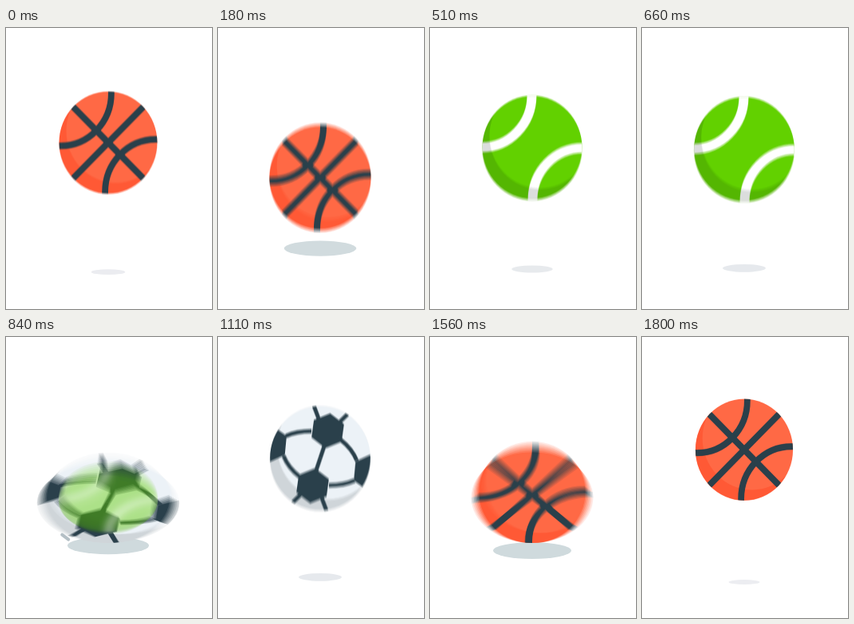
An HTML page with a canvas for the animation above (1.83 s loop, 258 px wide and 352 px high).

```html
<!DOCTYPE html>
<html lang="en">
<head>
<meta charset="utf-8">
<title>Bouncing balls</title>
<style>
  html, body { margin: 0; width: 100%; height: 100%; overflow: hidden; background: #fff; }
  canvas { display: block; }
</style>
</head>
<body>
<canvas id="stage" width="258" height="352"></canvas>
<script>
const W = 258, H = 352, LOOP = 1830, STEP = 30;
const HOP = LOOP / 3, LEAD = 30;
const R = 63, CX = 128, TOP = 141, FLOOR = 257;
const INK = '#2a404b';
const SHUTTER = 22, SAMPLES = 8;

const stage = document.getElementById('stage').getContext('2d');
const buffer = Object.assign(document.createElement('canvas'), { width: W, height: H });
const ctx = buffer.getContext('2d');

const clamp = v => Math.max(0, Math.min(1, v));
const lerp = (a, b, k) => a + (b - a) * k;

function disc(x, y, r, fill) {
  ctx.beginPath();
  ctx.arc(x, y, r, 0, 7);
  ctx.fillStyle = fill;
  ctx.fill();
}

function line(width, color, x1, y1, x2, y2, bendX = x1, bendY = y1) {
  ctx.beginPath();
  ctx.moveTo(x1, y1);
  ctx.quadraticCurveTo(bendX, bendY, x2, y2);
  ctx.lineWidth = width;
  ctx.strokeStyle = color;
  ctx.stroke();
}

function hexagon(x, y, r, turn) {
  ctx.beginPath();
  for (let i = 0; i < 6; i++) {
    const a = turn + i * Math.PI / 3;
    ctx.lineTo(x + r * Math.cos(a), y + r * Math.sin(a));
  }
  ctx.fillStyle = INK;
  ctx.fill();
}

// two seams bending away from the middle
function seams(offset, r, width, color) {
  ctx.lineWidth = width;
  ctx.strokeStyle = color;
  for (const side of [-1, 1]) {
    ctx.beginPath();
    ctx.arc(side * offset, side * offset, r, 0, 7);
    ctx.stroke();
  }
}

// crescent along the lower left edge
function shade(color) {
  ctx.beginPath();
  ctx.rect(-90, -90, 180, 180);
  ctx.arc(10, -14, R + 1, 0, 7);
  ctx.fillStyle = color;
  ctx.fill('evenodd');
}

function basketball() {
  disc(0, 0, R + 2, '#ff6945');
  shade('rgba(255,70,35,.45)');
  seams(61, 65, 8, INK);
  for (const side of [-1, 1]) line(8, INK, -50, side * 49, 50, side * -49);
}

function tennis() {
  disc(0, 0, R + 2, '#62d100');
  seams(63.5, 63, 12, '#fff');
  shade('rgba(0,20,20,.14)');
}

// the pattern is one half, repeated after a half turn
function soccer() {
  disc(0, 0, R + 2, '#ecf2f7');
  shade('rgba(0,0,0,.12)');
  ctx.scale(1, .96);
  for (let half = 0; half < 2; half++) {
    hexagon(9.5, -34.5, 22, .66);
    hexagon(-64, -18, 24, -.43);
    line(5, INK, 0, 0, 6, -18);
    line(5, INK, -2, -50, -8, -66);
    line(5, INK, 24, -45, 37, -58);
    line(5, INK, -11, -34, -43, -28, -30, -34);
    line(5, INK, 26, -23, 46, 3, 40, -12);
    ctx.rotate(Math.PI);
  }
}

const BALLS = [basketball, tennis, soccer];

function ball(draw, x, y, sx, sy) {
  ctx.save();
  ctx.translate(x, y);
  ctx.scale(sx, sy);
  ctx.beginPath();
  ctx.arc(0, 0, R, 0, 7);
  ctx.clip();
  draw();
  ctx.restore();
}

function shadow(drop) {
  const w = 39 + 1.45 * drop - .0073 * drop * drop;
  const h = 6 + (w - 39) * .254;
  const k = clamp(drop / 50);
  const rgb = [lerp(236, 207, k), lerp(237, 218, k), lerp(241, 221, k)].map(Math.round);
  ctx.beginPath();
  ctx.ellipse(CX, 307 - .53 * drop - .0029 * drop * drop, w / 2, h / 2, 0, 0, 7);
  ctx.fillStyle = `rgb(${rgb})`;
  ctx.fill();
}

// short dash thrown up and left by the impact
function dash(sinceHit) {
  const k = (sinceHit + 60) / 110;
  if (k < 0 || k > 1) return;
  const x = lerp(79, 44, k), y = lerp(254, 229, k);
  ctx.lineCap = 'round';
  ctx.globalAlpha = 1 - k * k;
  line(4, '#b3bec4', x - 4, y - 3, x + 4, y + 3);
  ctx.globalAlpha = 1;
  ctx.lineCap = 'butt';
}

function pose(time) {
  const hop = Math.floor((time + LEAD) / HOP);
  const sinceHit = time + LEAD - (hop + .5) * HOP;
  const fromPeak = HOP / 2 - Math.abs(sinceHit);
  const drop = Math.min(67, 64 * Math.pow(fromPeak / 260, 1.5));
  return { hop, sinceHit, drop };
}

function drawGround(time) {
  const { sinceHit, drop } = pose(time);
  ctx.fillStyle = '#fff';
  ctx.fillRect(0, 0, W, H);
  shadow(drop);
  dash(sinceHit);
}

function drawBall(time) {
  const { hop, sinceHit, drop } = pose(time);
  const y = TOP + drop;
  const grow = 1 + .042 * clamp(drop / 15);
  const squash = Math.min(1, (FLOOR - y) / 65);
  const sx = 61 / R * grow * Math.pow(squash, -1.2);
  const sy = 63.5 / R * grow * squash;

  const swap = clamp((sinceHit + 85) / 80);
  ball(BALLS[(hop + (swap > 0 ? 1 : 0)) % 3], CX, y, sx, sy);
  if (swap > 0 && swap < 1) {
    const size = 1 - .5 * swap;
    ctx.globalAlpha = Math.pow(1 - swap, 1.2);
    ctx.filter = `blur(${(9 * swap).toFixed(1)}px)`;
    ball(BALLS[hop % 3], CX, y, sx * size, sy * size);
    ctx.filter = 'none';
    ctx.globalAlpha = 1;
  }
}

// average several moments of the ball for motion blur
function render(time) {
  for (let i = 0; i < SAMPLES; i++) {
    drawGround(time);
    drawBall(time + SHUTTER * ((i + .5) / SAMPLES - .5));
    stage.globalAlpha = 1 / (i + 1);
    stage.drawImage(buffer, 0, 0);
  }
}

const start = performance.now();
let shown = -1;
function tick() {
  const elapsed = Math.max(0, performance.now() - start) % LOOP;
  const time = Math.floor(elapsed / STEP) * STEP;
  if (time !== shown) render(shown = time);
  requestAnimationFrame(tick);
}
tick();
</script>
</body>
</html>
```
